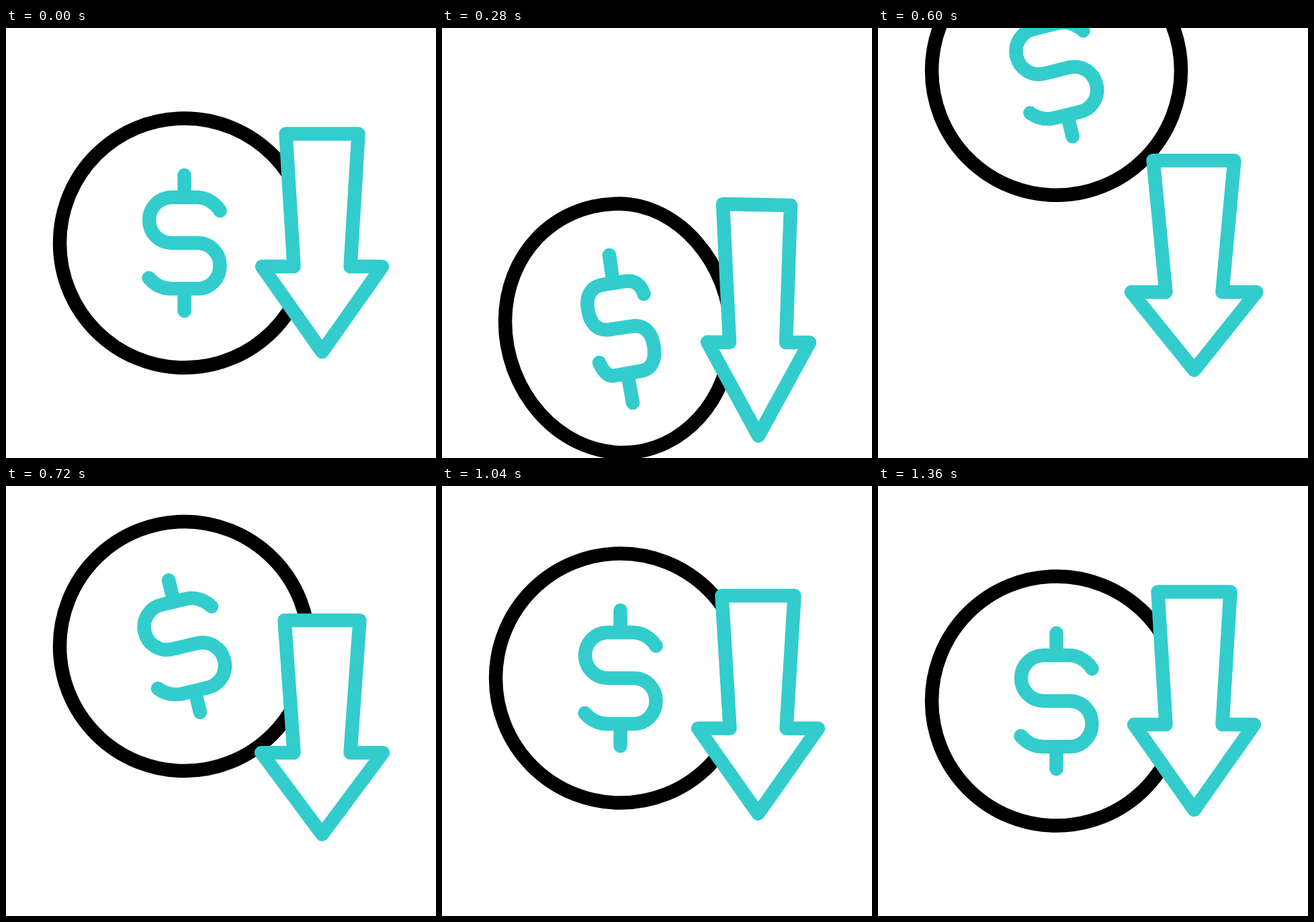
An HTML page that plays this animation: 640 px wide and 640 px high, repeating every 1480 ms.

```html
<!DOCTYPE html>
<html lang="en">
<head>
<meta charset="utf-8">
<title>Falling price</title>
<style>
  html, body { margin: 0; width: 100%; height: 100%; overflow: hidden; background: #fff; }
  svg { display: block; width: 100vw; height: 100vh; }
  path, circle { fill: none; stroke: #33cccc; stroke-width: 20.5; stroke-linecap: round; stroke-linejoin: round; }
  .ring { stroke: #000; }
  #arrow { fill: #fff; }
</style>
</head>
<body>
<svg viewBox="0 0 640 640">
  <path id="ring" class="ring"/>
  <path id="sign"/>
  <g id="drop">
    <circle class="ring" cx="265.5" cy="320" r="185.5"/>
    <path id="dropSign"/>
  </g>
  <path id="arrow"/>
</svg>
<script>
const LOOP = 1480, STEP = 40;
const el = id => document.getElementById(id);

// Monotone cubic curve through keys [time, value], flat at peaks and ends.
function curve(keys, t) {
  const n = keys.length - 1;
  if (t <= keys[0][0]) return keys[0][1];
  if (t >= keys[n][0]) return keys[n][1];
  const rise = i => (keys[i + 1][1] - keys[i][1]) / (keys[i + 1][0] - keys[i][0]);
  const slope = i => {
    if (i === 0 || i === n) return 0;
    const a = rise(i - 1), b = rise(i);
    return a * b > 0 ? 2 * a * b / (a + b) : 0;
  };
  let i = 0;
  while (t >= keys[i + 1][0]) i++;
  const [t0, v0] = keys[i], [t1, v1] = keys[i + 1];
  const h = t1 - t0, u = (t - t0) / h, w = 1 - u;
  return w * w * ((1 + 2 * u) * v0 + u * h * slope(i)) +
         u * u * ((3 - 2 * u) * v1 - w * h * slope(i + 1));
}

const NUM = /-?\d+(\.\d+)?/g;

// Same path moved down by dy.
function lower(d, dy) {
  let i = 0;
  return d.replace(NUM, v => i++ % 2 ? +v + dy : v);
}

// Path morph between poses [time, path] that share one command layout.
function morph(poses) {
  const rows = poses.map(([t, d]) => [t, d.match(NUM).map(Number)]);
  return t => {
    let i = 0;
    return poses[0][1].replace(NUM, () => {
      const k = i++;
      return curve(rows.map(([time, v]) => [time, v[k]]), t).toFixed(2);
    });
  };
}

const signRest = 'M318.5 272C311 260 298 252 284 252L247 252C228 252 213 267 213 286C213 305 228 320 247 320' +
  'L285 320C304 320 318.5 335 318.5 354C318.5 373 304 388 285 388L247 388C233 388 221 382 212.5 372' +
  'M265.5 219L265.5 251M265.5 388L265.5 421';
const signLean = 'M300.5 396C296 381 286 375 272 377L240 382C221 385 214 399 217 418C220 440 231 451 249 449' +
  'L285 443.5C302 442 313 454 315.5 475C318 495 312 508 296 510.5L256 517.5C245 519 239 509 234 498' +
  'M249 338L254 374M276 514L284 558';
const signTilt = 'M286 587C279 573 267 569 254 575L230 584C212 591 205 606 210 622C216 641 229 653 247 647' +
  'L279 637C298 632 311 640 319 660C326 680 321 696 304 703L268 717C256 721 248 712 242 701' +
  'M222 543L236 577M288 708L305 748';

const ringRest = 'M265.5 134.5C368 134.5 451 217.5 451 320C451 422.5 368 505.5 265.5 505.5' +
  'C163 505.5 80 422.5 80 320C80 217.5 163 134.5 265.5 134.5Z';
const ringLean = 'M264 261.5C350 261.5 430 350 430 455C430 552 358 632 270 632' +
  'C172 632 94 540 94 437C94 338 166 261.5 264 261.5Z';
const ringTilt = 'M258 460C345 460 436 560 436 670C436 760 360 831 270 831' +
  'C170 831 89 735 89 632C89 535 168 460 258 460Z';

const arrowRest = 'M416.5 157.5L524.5 157.5L512.5 355L560 355L470.5 482L381 355L428.5 355Z';

const fall = (a, b, c) => morph([[80, a], [280, b], [440, c], [580, lower(c, 230)]]);
const ring = fall(ringRest, ringLean, ringTilt);
const sign = fall(signRest, signLean, signTilt);

const arrow = morph([
  [80, arrowRest],
  [280, 'M418 262L519 264L512 468L547 468L471 607L395 467.5L428 468Z'],
  [440, 'M404 170L534.5 171L512 364.5L564 365L471 464L373.5 364.5L428 364.5Z'],
  [480, 'M402.5 160L536 160L512 353L565.5 353L471 451L372.5 353L428 353Z'],
  [640, 'M412 204L528.5 204L512.5 400.5L562.5 400.5L470.5 520L378.5 400.5L428.5 400.5Z'],
  [720, 'M414.5 200L526.5 200L512.5 397L561 397L470.5 518.5L380 397L428.5 397Z'],
  [880, lower(arrowRest, 24)],
  [1040, lower(arrowRest, 5.7)],
  [1240, arrowRest]
]);

const dropY = [[380, -250], [440, -160], [720, 238.5], [800, 377], [880, 349.5], [1040, 286], [1200, 314], [1360, 320]];
const dropTurn = [[440, -14], [720, -13.4], [880, -11.4], [1040, 0]];

el('dropSign').setAttribute('d', signRest);

function draw(now) {
  const t = Math.floor(now % LOOP / STEP) * STEP;
  el('ring').setAttribute('d', ring(t));
  el('sign').setAttribute('d', sign(t));
  el('arrow').setAttribute('d', arrow(t));
  el('drop').setAttribute('transform', `translate(0 ${curve(dropY, t) - 320})`);
  el('dropSign').setAttribute('transform', `rotate(${curve(dropTurn, t)} 265.5 320)`);
}

const start = performance.now();
function tick() {
  draw(performance.now() - start);
  requestAnimationFrame(tick);
}
tick();
</script>
</body>
</html>
```
